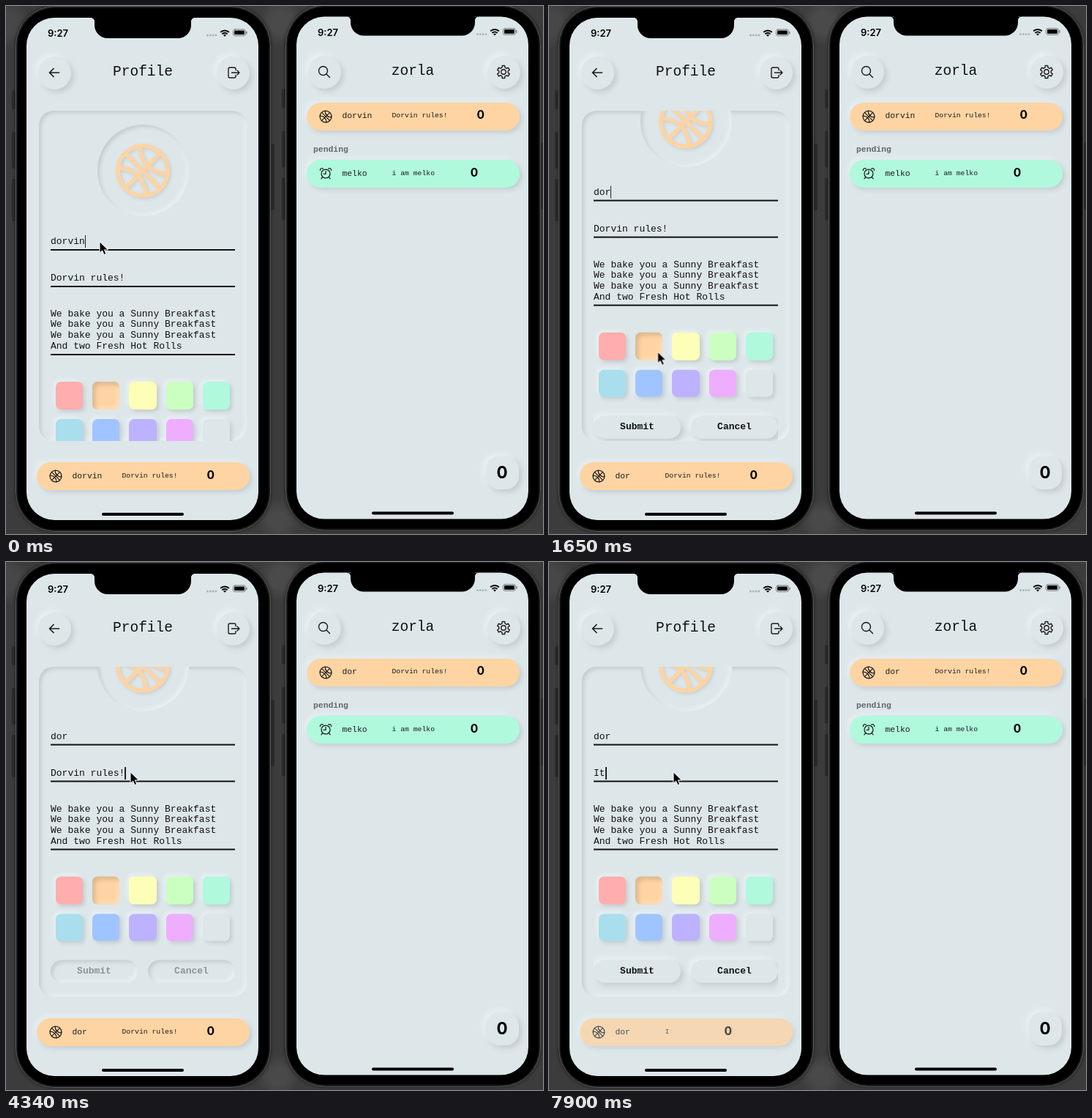
Write an HTML page that moves like this. It is 734 px wide and 721 px high and loops after 8000 ms.

```html
<!DOCTYPE html>
<html lang="en">
<head>
<meta charset="utf-8">
<title>Profile editor</title>
<style>
:root { --bg: #dde6e9; --lo: #c4cdd0; --hi: #e8f0f3; --peach: #ffd4a3; --mint: #b0f9dd; }
* { box-sizing: border-box; }
html, body { margin: 0; width: 100%; height: 100%; overflow: hidden; background: #3c3c3c; }
#stage { position: absolute; left: 0; top: 0; width: 734px; height: 721px; overflow: hidden;
  font-family: "Liberation Mono", "Courier New", monospace; color: #111;
  background: radial-gradient(circle at 376px 22px, #4a4a4a 0 14px, transparent 32px),
    radial-gradient(circle at 0 25px, #474747 0 16px, transparent 34px),
    radial-gradient(circle at 372px 702px, #494949 0 12px, transparent 30px), #3c3c3c; }
#stage div, #stage svg, .caret { position: absolute; }
.t { white-space: pre; line-height: 20px; height: 20px; margin-top: -10px; }
.c { transform: translateX(-50%); }
.sans { font-family: Inter, "Liberation Sans", sans-serif; }

.phone { left: 13px; top: 0; width: 349px; height: 718px; }
.body { inset: 0; border-radius: 54px; background: #000; border: 1.5px solid #5c5c5c; box-shadow: inset 0 0 0 2px #171717, 0 0 4px #1c1c1c; }
.key { width: 5px; background: #2b2b2b; border-radius: 2px; }
.screen { left: 15px; top: 16px; width: 317px; height: 686px; border-radius: 38px; background: var(--bg); }
.notch { top: 12px; left: 173.7px; transform: translateX(-50%); background: #000; border-radius: 0 0 18px 18px; }
.notch::before, .notch::after { content: ""; position: absolute; top: 4px; width: 5px; height: 5px; }
.notch::before { right: 100%; background: radial-gradient(circle at 0 100%, transparent 4.6px, #000 5.2px); }
.notch::after { left: 100%; background: radial-gradient(circle at 100% 100%, transparent 4.6px, #000 5.2px); }
.home { left: 117.7px; top: 692px; width: 112.5px; height: 4px; border-radius: 2px; background: #000; }

.up { background: var(--bg); box-shadow: 4px 4px 7px var(--lo), -4px -4px 7px var(--hi); }
.in { background: var(--bg); box-shadow: inset 3px 3px 5px var(--lo), inset -3px -3px 5px var(--hi); }
.round { width: 45px; height: 45px; margin: -22.5px; border-radius: 50%; }
.title { font-size: 19.5px; }
svg { overflow: visible; fill: none; stroke: #1b1b1b; stroke-width: 1.4; stroke-linecap: round; stroke-linejoin: round; }

#panel { left: 45px; top: 142.5px; width: 284px; height: 451px; border-radius: 20px; overflow: hidden; }
#list { left: -45px; top: -142.5px; width: 400px; height: 800px; animation: scroll 8s linear infinite; }
.f { left: 61px; font-size: 13px; }
.line { left: 61px; width: 252px; height: 2px; background: #111; }
.caret { width: 1.4px; height: 17px; margin-top: 1px; background: #222; opacity: 0; }
#nameCaret { animation: nameCaret 8s step-end infinite; }
#statCaret { animation: statCaret 8s step-end infinite; }
#hint { color: #737a7d; }
.err { animation: err 8s linear infinite; opacity: 0; color: #d24a48; }
.err.line { background: #c53733; }
.sw { width: 37.5px; height: 37.5px; border-radius: 7px; box-shadow: 3px 3px 5px var(--lo), -3px -3px 5px var(--hi); }
.sw.on { box-shadow: inset 4px 4px 6px #d9b78f, inset -3px -3px 5px #ffdfb8; }
#buttons { left: 61px; top: 615px; width: 252px; height: 56px; overflow: hidden; }
.btn { top: 11.5px; width: 119px; height: 31px; border-radius: 15.5px; font: bold 13px/30px "Liberation Mono", "Courier New", monospace; text-align: center; }
.btn .in, .btn .up { inset: 0; border-radius: inherit; }
.btn .in { color: #8b9396; }
.btn .up { animation: cancel 8s linear infinite; }
.btn.submit .up { animation-name: submit; }

.row { width: 290.5px; height: 38px; border-radius: 19px; box-shadow: 3px 3px 6px var(--lo), -3px -3px 6px var(--hi); color: #1c1c1c; }
.row .name { left: 48.5px; top: 18.7px; font-size: 11.35px; }
.row .stat { left: 116.5px; top: 18.7px; font-size: 9.75px; }
.row .num { top: 17.7px; font-size: 15.6px; font-weight: 650; color: #000; }
#mouse { left: 0; top: 0; animation: mouse 8s linear infinite; }

@keyframes scroll {
  0%, 14.4% { transform: none; }
  16.9% { transform: translateY(-19.5px); }
  20% { transform: translateY(-62px); }
  22.5% { transform: translateY(-83px); }
  24.2% { transform: translateY(-84.2px); }
  28%, 100% { transform: translateY(-83.5px); }
}
@keyframes mouse {
  0%, 14% { transform: translate(128px, 322px); }
  16.9% { transform: translate(146px, 380px); }
  20% { transform: translate(149px, 460px); }
  24.2% { transform: translate(146px, 543px); }
  28% { transform: translate(134px, 562px); }
  31%, 41.2% { transform: translate(132px, 563px); }
  43%, 46% { transform: translate(130px, 559px); }
  50% { transform: translate(150px, 425px); }
  54%, 100% { transform: translate(170px, 287px); }
}
@keyframes nameCaret {
  0%, 19.8%, 33%, 46.2% { opacity: 1; }
  13.1%, 26.4%, 39.6%, 52.9%, 100% { opacity: 0; }
}
@keyframes statCaret {
  0%, 58%, 93.5% { opacity: 0; }
  52.9%, 65%, 95%, 100% { opacity: 1; }
}
@keyframes err {
  0%, 87.5% { opacity: 0; }
  89.2%, 95.1% { opacity: 1; }
  96.8%, 100% { opacity: 0; }
}
@keyframes cancel {
  0%, 29.6% { opacity: 1; }
  32.3%, 65% { opacity: 0; }
  67.6%, 100% { opacity: 1; }
}
@keyframes submit {
  0%, 29.6% { opacity: 1; }
  32.3%, 65% { opacity: 0; }
  67.6%, 87.5% { opacity: 1; }
  90%, 95.1% { opacity: 0; }
  97.6%, 100% { opacity: 1; }
}
</style>
</head>
<body>
<div id="stage">
  <svg width="0" height="0">
    <defs>
      <g id="ball">
        <circle r="11"/>
        <path d="M-7.8-7.8 7.8 7.8M7.8-7.8-7.8 7.8M10.9 1.2C4 1.6-1.6-4-1.2-10.9M-10.9-1.2C-4-1.6 1.6 4 1.2 10.9"/>
      </g>
      <g id="alarm">
        <circle r="8.3"/>
        <path d="M0-5V0.5H-4M-6 6.5-8.5 9.5M6 6.5 8.5 9.5M-10.5-6C-11-9.5-8-11-5-9.6M10.5-6C11-9.5 8-11 5-9.6"/>
      </g>
    </defs>
  </svg>

  <div id="phones"></div>

  <div class="up round" style="left:66px;top:91px"></div>
  <div class="up round" style="left:310.5px;top:91px"></div>
  <div class="up round" style="left:435px;top:90px"></div>
  <div class="up round" style="left:680px;top:90px"></div>
  <svg style="left:66px;top:91px" width="1" height="1"><path stroke-width="1.7" d="M6.5 0H-6.5M-1-5.5-6.5 0-1 5.5"/></svg>
  <svg style="left:311px;top:91px" width="1" height="1"><path d="M3-3.5V-5a2 2 0 0 0-2-2H-5a2 2 0 0 0-2 2V5a2 2 0 0 0 2 2H1a2 2 0 0 0 2-2V3.5M-2.5 0H8M5-3 8 0 5 3"/></svg>
  <svg style="left:435px;top:90px" width="1" height="1"><circle cx="-1.5" cy="-1.5" r="6"/><path d="M3 3 7.5 7.5"/></svg>
  <svg style="left:680px;top:90px" width="1" height="1"><circle r="3.2"/><path id="gear"/></svg>
  <div class="t c title" style="left:187px;top:90.3px">Profile</div>
  <div class="t c title" style="left:556px;top:89.4px">zorla</div>

  <div id="panel" class="in">
    <div id="list">
      <div class="in" style="left:124.5px;top:162px;width:125px;height:125px;border-radius:50%"></div>
      <svg style="left:187px;top:225px;filter:drop-shadow(2px 2px 2px #c8cfd0)" width="1" height="1"><use href="#ball" transform="scale(3.1)" stroke="#ffd4a3" stroke-width="1.75"/></svg>
      <div class="t f" style="top:322px"><span id="name"></span><i class="caret" id="nameCaret"></i></div>
      <div class="line" style="top:332.3px"></div>
      <div class="t f" id="hint" style="top:371.5px">status</div>
      <div class="t f" style="top:371.5px"><span id="stat"></span><i class="caret" id="statCaret"></i></div>
      <div class="line" style="top:382px"></div>
      <div class="line err" style="top:382px"></div>
      <div class="t f err" style="top:394px;font-size:9.75px">Status should not be empty</div>
      <div class="f" style="top:413.6px;line-height:14.65px;white-space:pre">We bake you a Sunny Breakfast
We bake you a Sunny Breakfast
We bake you a Sunny Breakfast
And two Fresh Hot Rolls</div>
      <div class="line" style="top:475.3px"></div>
      <div id="swatches"></div>
      <div id="buttons">
        <div class="btn submit" style="left:0"><div class="in">Submit</div><div class="up">Submit</div></div>
        <div class="btn" style="left:133px"><div class="in">Cancel</div><div class="up">Cancel</div></div>
      </div>
    </div>
  </div>

  <div class="t" style="left:420px;top:196px;font-size:11.4px;font-weight:bold;color:#60676a">pending</div>
  <div id="rows"></div>
  <div class="up" style="left:656px;top:615px;width:45px;height:45px;border-radius:18px"></div>
  <div class="t c sans" style="left:678.2px;top:636.5px;font-size:22.5px;font-weight:650;color:#000">0</div>

  <svg id="mouse" width="1" height="1"><path d="M0 0V15.2L3.6 11.9 6 17.6 8.8 16.4 6.4 10.9H11.2Z" fill="#000" stroke="#fff" stroke-width="1"/></svg>
</div>

<script>
const LOOP = 8000, FADE = 400;
const $ = id => document.getElementById(id);

function add(parent, cls, css = '', html = '') {
  const el = document.createElement('div');
  el.className = cls;
  el.style.cssText = css;
  el.innerHTML = html;
  parent.append(el);
  return el;
}

function phone(x, y, notchW, notchH) {
  const p = add($('phones'), 'phone', `transform:translate(${x}px,${y}px)`);
  [[115, 26], [172, 50], [236, 58]].forEach(([top, h]) => add(p, 'key', `left:-5px;top:${top}px;height:${h}px`));
  add(p, 'key', 'left:349px;top:188px;height:91px');
  add(p, 'body');
  add(p, 'screen');
  add(p, 'notch', `width:${notchW}px;height:${notchH}px`);
  add(p, 'home');
  add(p, 't c sans', 'left:58px;top:36.7px;font-size:13px;font-weight:600;color:#000', '9:27');
  add(p, '', 'left:261px;top:40px', `<svg width="1" height="1" stroke="none">
    <g fill="#a9b1b4" stroke="none"><circle cx="1.5" r="1.4"/><circle cx="5.3" r="1.4"/><circle cx="9.1" r="1.4"/><circle cx="12.9" r="1.4"/></g>
    <g stroke="#000" stroke-width="2" stroke-linecap="butt"><path d="M19.2-4.3A8.5 8.5 0 0 1 30.8-4.3M21.4-1.7A5.2 5.2 0 0 1 28.6-1.7"/></g>
    <path d="M25 1.8 23 -.3A3 3 0 0 1 27-.3Z" fill="#000" stroke="none"/>
    <rect x="36.5" y="-8" width="17" height="8.6" rx="2.6" stroke="#777" stroke-width="1"/>
    <rect x="38" y="-6.5" width="14" height="5.6" rx="1.3" fill="#000" stroke="none"/>
    <path d="M55-5V-2.4" stroke="#777" stroke-width="1.2"/></svg>`);
}

function row(x, y, color, icon, name, stat) {
  const r = add($('rows'), 'row', `left:${x}px;top:${y}px;background:${color}`);
  add(r, '', 'left:25.5px;top:19.2px', `<svg width="1" height="1"><use href="#${icon}" transform="scale(.72)" stroke-width="1.75"/></svg>`);
  add(r, 't name', '', name);
  add(r, 't stat', '', stat);
  // the counter slides left as the status gets shorter
  const num = 237.7 - 2.92 * (13 - Math.max(1, stat.length));
  add(r, 't c num sans', `left:${num}px`, '0');
  return r;
}

// Typing: [time, name, status]
const FULL = 'Dorvin rules!';
const edits = [[-FADE, 'dorvin', FULL]];
for (let k = 1; k <= 3; k++) edits.push([150 * k, 'dorvin'.slice(0, 6 - k), FULL]);
for (let k = 0; k < 13; k++) edits.push([5200 + 150 * k, 'dor', FULL.slice(0, 12 - k)]);
edits.push([7610, 'dor', 'I'], [7880, 'dor', 'It']);
const saved = [edits[0], [2500, 'dor', FULL]];

phone(0, 0, 132, 32);
phone(369, -1.4, 170, 30);

const colors = ['#ffadad', '#ffd4a3', '#fdffb6', '#caffbf', '#b0f9dd', '#a9deec', '#a0c4ff', '#bdb2ff', '#efadff', '#dde6e9'];
colors.forEach((c, i) => add($('swatches'), i === 1 ? 'sw on' : 'sw',
  `left:${67.5 + 50.35 * (i % 5)}px;top:${513.3 + 50.3 * Math.floor(i / 5)}px;background:${c}`));

const teeth = [];
for (let i = 0; i < 6; i++) {
  for (const [r, d] of [[6.3, -19], [8.7, -12], [8.7, 12], [6.3, 19]]) {
    const a = (i * 60 + d - 90) * Math.PI / 180;
    teeth.push((r * Math.cos(a)).toFixed(2) + ' ' + (r * Math.sin(a)).toFixed(2));
  }
}
$('gear').setAttribute('d', 'M' + teeth.join('L') + 'Z');

const stack = (list, x, y) => list.map(([at, name, stat], i) => ({
  at, end: list[i + 1] ? list[i + 1][0] : Infinity,
  el: row(x, y, 'var(--peach)', 'ball', name, stat)
}));
const layers = [...stack(saved, 411, 131.6), ...stack(edits, 42, 623.3)];
row(411, 210, 'var(--mint)', 'alarm', 'melko', 'i am melko');

// Each layer fades in, then out from wherever it got to when replaced
function opacity({ at, end }, t) {
  const rise = Math.min(1, (Math.min(t, end) - at) / FADE);
  const fall = Math.max(0, t - end) / FADE;
  return Math.max(0, rise - fall);
}

let start;
function draw(now) {
  start ??= now;
  const t = (now - start) % LOOP;
  const [, name, stat] = edits.filter(e => e[0] <= t).pop();
  $('name').textContent = name;
  $('stat').textContent = stat;
  $('hint').style.visibility = stat ? 'hidden' : 'visible';
  for (const l of layers) {
    const o = opacity(l, t);
    l.el.style.opacity = o;
    l.el.style.visibility = o ? 'visible' : 'hidden';
  }
  requestAnimationFrame(draw);
}
requestAnimationFrame(draw);
</script>
</body>
</html>
```
